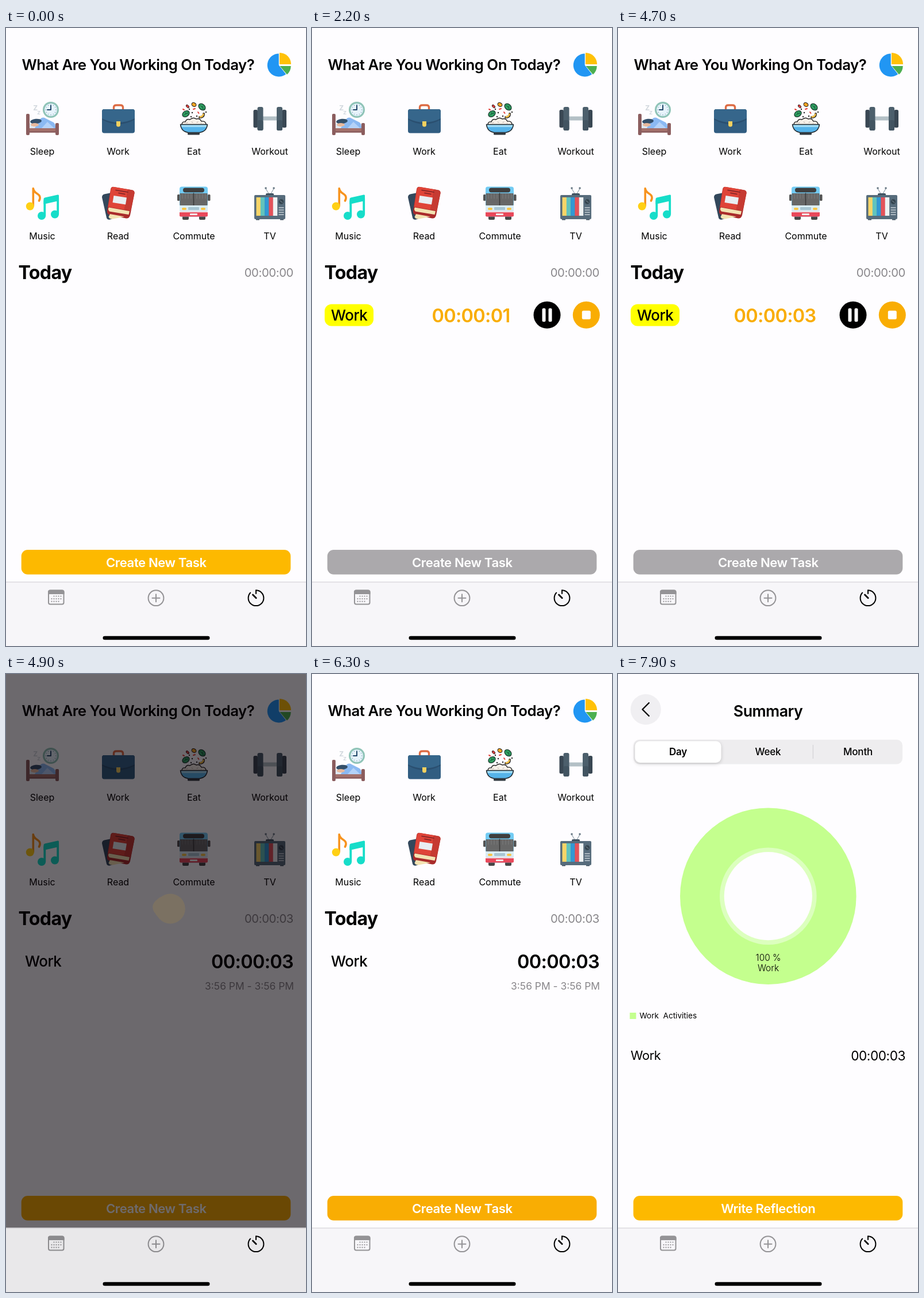
Animation of 522x1073 px, one loop 8000 ms. Source, as an HTML page with a canvas:

```html
<!DOCTYPE html>
<html lang="en">
<head>
<meta charset="utf-8">
<title>Task timer</title>
<style>
html, body { margin: 0; width: 100%; height: 100%; overflow: hidden; background: #fefdff; }
canvas { display: block; width: 522px; height: 1073px; }
</style>
</head>
<body>
<canvas id="stage"></canvas>
<script>
const W = 522, H = 1073, LOOP = 8000, TAU = Math.PI * 2;
const PAPER = '#fefdff', GOLD = '#fdb900', AMBER = '#f9ad03', GREY = '#88868a';
const START = 1100, STOP = 4800, PUSH = 6779, PUSH_TIME = 600;
const canvas = document.getElementById('stage');
const c = canvas.getContext('2d');
const dpr = window.devicePixelRatio || 1;
canvas.width = W * dpr;
canvas.height = H * dpr;

const clamp = (v) => Math.min(1, Math.max(0, v));
const ramp = (t, a, b) => clamp((t - a) / (b - a));
const mix = (a, b, k) => a + (b - a) * k;

function bezier(x, x1, y1, x2, y2) {
  if (x <= 0 || x >= 1) return clamp(x);
  const at = (s, a, b) => 3 * a * s * (1 - s) ** 2 + 3 * b * s * s * (1 - s) + s ** 3;
  let lo = 0, hi = 1;
  for (let i = 0; i < 30; i++) {
    const mid = (lo + hi) / 2;
    if (at(mid, x1, x2) < x) lo = mid; else hi = mid;
  }
  return at(lo, y1, y2);
}

function fill(color) { c.fillStyle = color; c.fill(); }

function rect(x, y, w, h, color, r = 0) {
  c.beginPath();
  c.roundRect(x, y, w, h, r);
  fill(color);
}

function disc(x, y, r, color) {
  c.beginPath();
  c.arc(x, y, r, 0, TAU);
  fill(color);
}

function oval(x, y, rx, ry, color, turn = 0) {
  c.beginPath();
  c.ellipse(x, y, rx, ry, turn, 0, TAU);
  fill(color);
}

function slice(x, y, r, a, b, color) {
  c.beginPath();
  c.moveTo(x, y);
  c.arc(x, y, r, a, b);
  c.closePath();
  fill(color);
}

function shape(d, color) {
  c.fillStyle = color;
  c.fill(new Path2D(d));
}

function line(d, color, width, cap = 'round') {
  c.strokeStyle = color;
  c.lineWidth = width;
  c.lineCap = cap;
  c.lineJoin = 'round';
  c.stroke(new Path2D(d));
}

// y is the middle of the capitals
function text(str, x, y, size, o = {}) {
  const { weight = 400, color = '#000', align = 'left', tight = true } = o;
  const track = tight ? size * (-0.0223 + 0.185 * Math.exp(-0.1745 * size)) : 0;
  c.font = `${weight} ${size}px Inter, "Open Sans", sans-serif`;
  c.letterSpacing = track + 'px';
  c.textAlign = align;
  c.textBaseline = 'alphabetic';
  c.fillStyle = color;
  c.fillText(str, x, y + size * 0.364);
}

function faded(alpha, draw) {
  if (alpha <= 0) return;
  c.save();
  c.globalAlpha *= alpha;
  draw();
  c.restore();
}

function pie() {
  slice(474.7, 64.5, 20, 0.9, Math.PI * 1.5, '#2196f3');
  slice(476, 63, 20, -Math.PI / 2, 0, '#ffc107');
  slice(476.5, 66, 19.2, 0, 0.87, '#4caf50');
}

function sleep() {
  text('z', 47, 138, 15, { weight: 600, color: '#d3d9df' });
  text('z', 54, 146, 11, { weight: 600, color: '#d3d9df' });
  rect(40, 166, 47, 9, '#dfe8f2');
  shape('M50 174 L58 160 Q63 153 69 157 L83 164 Q87 169 86 175 L50 176Z', '#8bb9f2');
  shape('M61 175 L72 163 L85 175Z', '#b4d2f8');
  oval(52, 162, 10, 4.2, '#34506b', -0.1);
  oval(50, 168, 7, 3, '#e8b99d');
  rect(39, 174, 49, 7.5, '#a4716b');
  rect(35, 149, 6, 37, '#8b5d5e', 2);
  rect(86, 165, 6, 21, '#8b5d5e', 2);
  rect(41, 179, 45, 2.5, '#8b5d5e');
  disc(78, 142, 14, '#90c4b8');
  disc(78, 142, 10.8, '#e6f3fb');
  for (let i = 0; i < 12; i++) {
    const a = i * TAU / 12;
    disc(78 + 8.8 * Math.cos(a), 142 + 8.8 * Math.sin(a), 0.7, '#6e94a8');
  }
  line('M78 134.5 V142 H72', '#24496b', 2);
}

function work() {
  line('M187.500 142 V138 Q187.500 134 192 134 H199 Q203.500 134 203.500 138 V142', '#dd6c45', 3.4, 'butt');
  rect(167, 141, 57, 41.5, '#315d81', 4);
  shape('M167 146 Q167 141 171 141 H220 Q224 141 224 146 V159 Q210 167 195.500 167 Q181 167 167 159Z', '#2a4f70');
  shape('M167 146 Q167 141 171 141 H220 Q224 141 224 146 V157 Q210 164 195.500 164 Q181 164 167 157Z', '#36668b');
  shape('M192 162 H199 V168 Q199 171.500 195.500 171.500 Q192 171.500 192 168Z', '#f3d05f');
}

function leaf(x, y, turn) {
  oval(x, y, 7.2, 5.4, '#17352b', turn);
  oval(x, y, 6, 4.2, '#30a262', turn);
  c.save();
  c.translate(x, y);
  c.rotate(turn);
  line('M-5 0 H5 M-1 0 L1 -2.500 M1 0 L3 2', '#17503a', 0.8);
  c.restore();
}

function eat() {
  leaf(313, 149, -0.6);
  leaf(341, 137, 0.7);
  oval(327, 133, 4.6, 3.8, '#262425', 0.5);
  oval(327, 133, 3.5, 2.7, '#f6a623', 0.5);
  oval(316, 136, 3.6, 2.3, '#3b2024', 0.8);
  oval(316, 136, 2.6, 1.4, '#e3413c', 0.8);
  line('M337 155 Q344 155 344 149', '#272425', 4);
  line('M337.500 154.500 Q343 154 343.500 149.500', '#fbc546', 2.4);
  line('M326 141 l3 -1 M308 141 l2 1 M334 146 l1.500 2', '#e3413c', 2);
  for (const [x, y] of [[324, 147], [332, 153], [319, 141], [348, 146], [322, 154]]) disc(x, y, 1.2, '#252525');
  const rice = 'M306 168 Q306 162 312 163 Q314 157 320 159 Q326 154 331 158 Q337 156 340 162 Q348 161 348 168Z';
  shape(rice, '#f7f1e9');
  line(rice, '#262626', 1.4);
  line('M314 165 l2 -1 M323 163 l2 1 M332 164 l2 -1 M339 166 l1 -1', '#b9ada4', 1);
  const bowl = 'M303.500 167.500 H350.500 Q349 180 337 181.500 H317 Q305 180 303.500 167.500Z';
  shape(bowl, '#56b4ea');
  shape('M304 168 H350 L349 172 H305Z', '#9fdcf7');
  line(bowl, '#20282e', 1.5);
  rect(316, 181, 21, 4.5, '#333a40', 1.5);
}

function workout() {
  rect(446, 153.5, 26, 7, '#b3c0c6');
  for (const x of [431, 481]) rect(x - 0.5, 142, 7.5, 31, '#394753', 2.5);
  for (const x of [437.5, 471]) {
    rect(x, 137, 10, 41, '#4c5f6c', 3);
    rect(x, 160, 10, 18, '#425461', 3);
  }
}

function music() {
  line('M47.300 309 V278.500 Q48 284 54 287.500 Q62 292 57.500 300', '#f7931e', 3.6);
  disc(41.8, 309.5, 7, '#ffd015');
  shape('M65.500 297 Q65.500 295 67.500 294.500 L90 289.500 Q92 289 92 291 V300 L65.500 306Z', '#16ddc9');
  line('M67.300 300 V326 M90.200 296 V323', '#16ddc9', 3.8);
  disc(62, 326, 7, '#16ddc9');
  disc(85, 323.5, 7, '#16ddc9');
}

function read() {
  shape('M167 294 Q167 289.500 171 288.500 L186 285.500 L196 327 L181 332.500 Q176.500 333.500 175 329.500Z', '#33485c');
  shape('M182 280 Q183 275 188 276 L220 281.500 Q224 282.500 223.500 287 L216 325 Q214.500 331 209 330.500 L181 325 Q175 323 176 317Z', '#a92b2b');
  shape('M179 311.500 L215 318 L213.500 324 L180 318.500 Q176.500 315 179 311.500Z', '#f3e3b2');
  shape('M181 323 L206 327.500 L186 331.500 Q180 332 178.500 328Z', '#f3e3b2');
  shape('M182.500 280 Q183.500 275.500 188 276 L212 280 L206 315.500 L177.500 310.500Z', '#df4438');
  shape('M212 280 L220 281.500 Q224 282.500 223.500 287 L217 317.500 L206 315.500Z', '#c63a32');
  shape('M187.500 291 L210 294.500 L208 306.500 L185.500 303Z', '#e9eef2');
  line('M191 281.500 L212 285 M196 286.500 L207 288.500', '#7c2427', 1.6);
}

function bus() {
  rect(307, 325, 11, 8, '#474747', 2);
  rect(336, 325, 11, 8, '#474747', 2);
  rect(298, 289, 4.5, 11, '#535353', 1.5);
  rect(351, 289, 4.5, 11, '#535353', 1.5);
  rect(302, 275.5, 49, 52, '#72cbf3', 4);
  rect(308, 277.5, 37, 8, '#3e3e3e', 4);
  rect(302.5, 287, 48, 21, '#676767', 1);
  for (let x = 307; x < 350; x += 5) line(`M${x} 288 v8`, '#7a7a7a', 1.2);
  line('M326.500 287 V308', '#383838', 1.5);
  rect(302, 308, 49, 11, '#d9edf6');
  rect(302, 318.5, 49, 9, '#e9485a', 2);
  rect(302, 318.5, 49, 1.5, '#f2f6f8');
  for (const x of [306, 339]) rect(x, 312, 8, 4, '#f8c547', 2);
  rect(317, 311, 19, 5, '#a8c6d3', 1);
  rect(320, 322, 13, 3, '#f4f4f4', 1);
}

function tv() {
  line('M458 289 L452 279 M460 289 L466 279', '#9ba7b0', 1.3);
  disc(452, 278, 1.8, '#697985');
  disc(466, 278, 1.8, '#697985');
  rect(452, 287, 14, 5, '#405261', 2);
  rect(435, 330, 6, 3.5, '#405261');
  rect(477, 330, 6, 3.5, '#405261');
  rect(432, 290, 54, 42, '#576c7c', 2);
  const bands = ['#f6d568', '#61c3bd', '#3298d3', '#e4525a', '#eef2f3'];
  bands.forEach((color, i) => rect(435.5 + i * 7.3, 294, 7.5, 32, color));
  disc(479, 301.5, 4.3, '#34444f');
  line('M477 300 L481 303', '#82919c', 1);
  for (let y = 312; y < 325; y += 4) line(`M475 ${y} H483`, '#c7d0d6', 1.3);
}

const tasks = [
  ['Sleep', sleep], ['Work', work], ['Eat', eat], ['Workout', workout],
  ['Music', music], ['Read', read], ['Commute', bus], ['TV', tv]
];

function bigButton(label, color) {
  rect(26.7, 906, 468.6, 42.7, color, 11);
  text(label, 261.3, 928, 22.1, { weight: 600, color: '#fff', align: 'center' });
}

function runningRow(t) {
  const secs = Math.min(3, Math.max(0, Math.floor((t - START) / 1000)));
  rect(22, 479.5, 85, 38, '#ffff00', 12);
  text('Work', 33, 498.5, 26, { weight: 500 });
  text('00:00:0' + secs, 344.5, 499, 32.5, { weight: 600, color: AMBER, align: 'right' });
  disc(409, 498.3, 23.5, '#000');
  rect(400.5, 486.5, 6, 23.5, '#fff', 2.6);
  rect(411.5, 486.5, 6, 23.5, '#fff', 2.6);
  disc(477.3, 498.3, 23.5, AMBER);
  rect(469.8, 490.8, 15, 15, '#fff', 2.5);
}

function doneRow() {
  text('Work', 33, 498.5, 26, { weight: 500 });
  text('00:00:03', 500, 499, 32.5, { weight: 600, align: 'right' });
  text('3:56 PM - 3:56 PM', 501, 542, 17.4, { color: GREY, align: 'right', tight: false });
}

function home(t) {
  rect(0, 0, W, H, PAPER);
  text('What Are You Working On Today?', 27.5, 63.5, 25.8, { weight: 600 });
  pie();
  tasks.forEach(([name, icon], i) => {
    icon();
    text(name, 63 + (i % 4) * 132, i < 4 ? 213.8 : 360.8, 16, { align: 'center', tight: false });
  });
  const done = t >= STOP;
  text('Today', 21.5, 424.5, 32.2, { weight: 700 });
  text(done ? '00:00:03' : '00:00:00', 500, 425, 20.2, { color: GREY, align: 'right' });
  const show = done ? 0 : ramp(t, START, START + 200);
  if (show < 1) bigButton('Create New Task', t < START ? GOLD : AMBER);
  faded(show, () => {
    bigButton('Create New Task', '#aba9ac');
    runningRow(t);
  });
  if (done) doneRow();
}

function summary() {
  rect(0, 0, W, H, PAPER);
  disc(48.3, 61.5, 26.5, '#f0eff2');
  line('M54.500 49.500 L42.500 61.500 L54.500 73.500', '#000', 2.4, 'butt');
  text('Summary', 261, 64.5, 26.8, { weight: 600, align: 'center' });
  rect(27, 114, 468, 42.5, '#eeedef', 10);
  c.save();
  c.shadowColor = 'rgba(0,0,0,.18)';
  c.shadowBlur = 6 * dpr;
  c.shadowOffsetY = 2 * dpr;
  rect(29.5, 116.5, 150, 37.5, '#fff', 9);
  c.restore();
  rect(338.8, 123, 1.2, 24, '#d3d2d5');
  text('Day', 104.5, 135, 17, { weight: 600, align: 'center' });
  text('Week', 261, 135, 17, { weight: 500, align: 'center' });
  text('Month', 417.5, 135, 17, { weight: 500, align: 'center' });
  disc(261.3, 385.7, 153.3, '#c4ff8e');
  disc(261.3, 385.7, 84.3, '#dcffbe');
  disc(261.3, 385.7, 76.6, PAPER);
  text('100 %', 261.5, 492, 15.4, { weight: 300, align: 'center', tight: false });
  text('Work', 261.5, 510.5, 15.4, { weight: 300, align: 'center', tight: false });
  rect(20.5, 588, 11, 11, '#c4ff8e');
  text('Work', 37.5, 593.5, 13.5, { tight: false });
  text('Activities', 78.5, 593.5, 13.6, { tight: false });
  text('Work', 22, 662.5, 21.8);
  text('00:00:03', 500, 662.5, 22.6, { align: 'right' });
  bigButton('Write Reflection', GOLD);
}

function tabBar() {
  const ink = '#949396';
  rect(0, 961.5, W, H - 961.5, '#f7f6f9');
  rect(0, 961.5, W, 1, '#cfced1');
  c.strokeStyle = ink;
  c.lineWidth = 2;
  c.beginPath();
  c.roundRect(74, 976.5, 26.5, 24, 3);
  c.stroke();
  rect(73, 975.5, 28.5, 7.5, ink, [4, 4, 0, 0]);
  for (let i = 1; i < 14; i++) {
    const col = i % 5, row = Math.floor(i / 5);
    disc(79.5 + col * 4, 986.5 + row * 4.6, 1.1, ink);
  }
  c.beginPath();
  c.arc(261, 989.7, 13.4, 0, TAU);
  c.stroke();
  line('M254.500 989.700 H267.500 M261 983.200 V996.200', ink, 2);
  c.strokeStyle = '#000';
  c.beginPath();
  c.arc(435, 989.7, 13.4, -Math.PI / 2, Math.PI * 1.24);
  c.stroke();
  line('M435 976.300 V982', '#000', 2);
  line('M429.500 984 L435.200 989.700', '#000', 2.8);
}

function loader(t) {
  const x = (t - 4863) / 1600;
  if (x < 0 || t > 5400) return;
  const alpha = mix(0.1, 0.82, ramp(t, 4910, 5090)) * (1 - ramp(t, 5220, 5400));
  faded(alpha, () => {
    c.beginPath();
    for (let k = 0; k < 5; k++) {
      const a = TAU * bezier(x, 0.5, 0.787 - 0.28 * k + 0.02 * k * k, 0.25, 1) - Math.PI / 2;
      const r = 26 * mix(1 - 0.2 * k, 0.2 + 0.2 * k, x ** 1.6);
      const px = 261 + 105.5 * Math.cos(a), py = 510 + 105.5 * Math.sin(a);
      c.moveTo(px + r, py);
      c.arc(px, py, r, 0, TAU);
    }
    fill('#fcbd03');
  });
}

function render(t) {
  c.setTransform(dpr, 0, 0, dpr, 0, 0);
  const p = bezier((t - PUSH) / PUSH_TIME, 0.32, 0.72, 0, 1);
  c.save();
  c.translate(-0.3 * W * p, 0);
  home(t);
  c.restore();
  if (p > 0) {
    rect(0, 0, W, H, `rgba(0,0,0,${0.1 * p})`);
    c.save();
    c.translate(W * (1 - p), 0);
    summary();
    c.restore();
  }
  const dim = ramp(t, 4740, 4850) * (1 - ramp(t, 4960, 5060));
  rect(0, 0, W, 962, `rgba(6,0,6,${0.585 * dim})`);
  tabBar();
  rect(0, 962, W, H - 962, `rgba(8,0,8,${0.06 * dim})`);
  rect(168.5, 1055.7, 186, 6.6, '#000', 3.3);
  loader(t);
}

const begin = performance.now();
function frame() {
  render((performance.now() - begin) % LOOP);
  requestAnimationFrame(frame);
}
frame();
</script>
</body>
</html>
```
